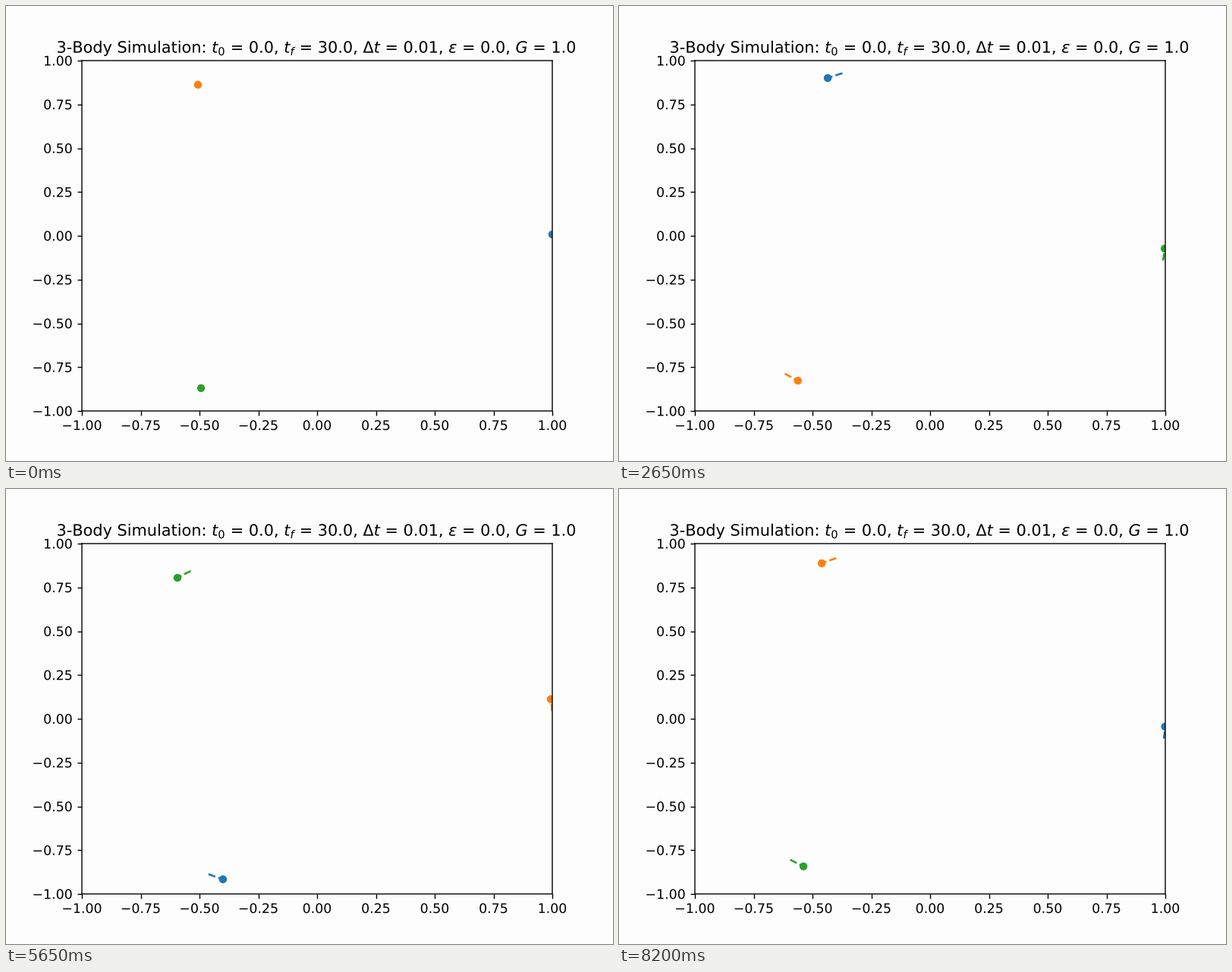
A matplotlib script for the animation above (8.25 s loop, 800 by 600 pixels).

```python
import numpy as np
import matplotlib.pyplot as plt
from matplotlib.animation import FuncAnimation
from matplotlib.patheffects import Normal

FRAMES, INTERVAL = 165, 50
DT = 0.01            # simulation time step
STRIDE = 5           # steps per drawn frame
TRAIL = 10           # points kept in each trail
OMEGA = 3 ** -0.25   # angular speed of three unit masses on the unit circle
PAPER = "#fefdfe"

# Smooth subpixel placement: no hinting or snapping, text and dots as paths
plt.rcParams.update({
    "font.family": "DejaVu Sans",
    "text.hinting": "none",
    "path.snap": False,
    "path.effects": [Normal()],
})

fig, ax = plt.subplots(figsize=(6.4, 4.8), dpi=125, facecolor=PAPER)
ax.set_facecolor(PAPER)
ax.set(xlim=(-1, 1), ylim=(-1, 1))
ax.set_title(
    r"3-Body Simulation: $t_0$ = 0.0, $t_f$ = 30.0, $\Delta t$ = 0.01, "
    r"$\varepsilon$ = 0.0, $G$ = 1.0"
)

bodies = []
for i, color in enumerate(("C0", "C1", "C2")):
    trail, = ax.plot([], [], "--", color=color, lw=1.5)
    dot, = ax.plot([], [], "o", color=color, ms=5)
    bodies.append((i * 2 * np.pi / 3, trail, dot))


def update(frame):
    last = STRIDE * frame
    steps = np.arange(max(0, last - TRAIL + 1), last + 1) + 1
    for phase, trail, dot in bodies:
        angle = phase + OMEGA * DT * steps
        x, y = np.cos(angle), np.sin(angle)
        trail.set_data(x, y)
        dot.set_data(x[-1:], y[-1:])
    return [artist for body in bodies for artist in body[1:]]


anim = FuncAnimation(fig, update, frames=FRAMES, interval=INTERVAL,
                     repeat=True, repeat_delay=0, blit=False)
plt.show()
```
